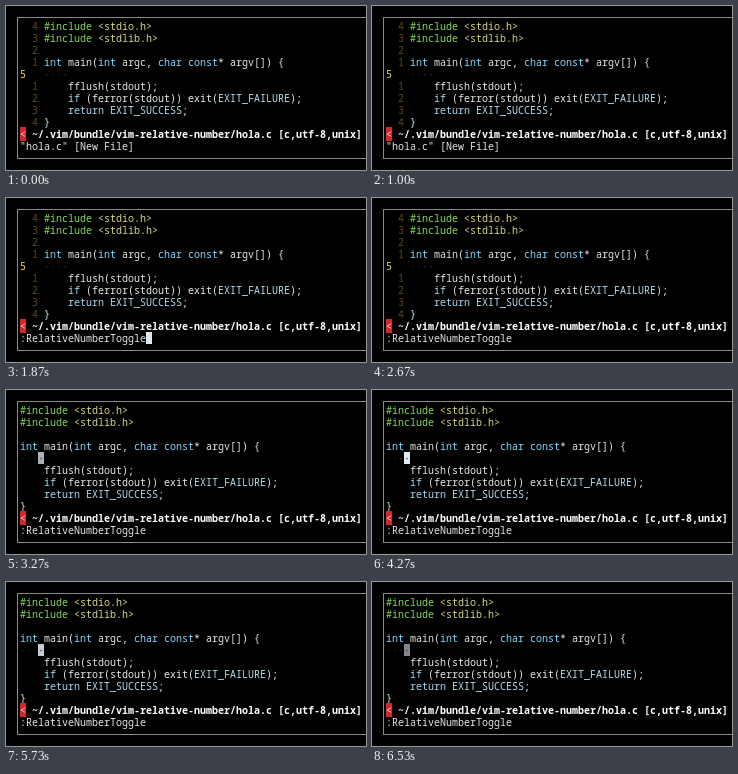
These frames come from a looping animation (360x164 px, 6600 ms). An HTML page:

```html
<!DOCTYPE html>
<html lang="en">
<head>
<meta charset="utf-8">
<title>Relative line numbers</title>
<style>
  html, body { margin: 0; width: 100%; height: 100%; overflow: hidden; background: #000; }
  #term {
    position: absolute; left: 11px; top: 11px; width: 349px; height: 140px;
    border: 1px solid #8a8a8a; border-right: 0;
  }
  .row, #cursor {
    position: absolute; left: 14px; height: 12px; margin: 0; white-space: pre;
    font: 10px/12px "Noto Sans Mono", "DejaVu Sans Mono", monospace; color: #e4e8ea;
  }
  .pre { color: #87d75f; }
  .inc { color: #d7d787; }
  .type { color: #87d7ff; }
  .key { color: #a8d8f0; }
  .const { color: #b8dcec; }
  .num { color: #5c4820; }
  .cur { color: #f0e040; }
  .trail { color: #34383c; }
  .status { font-weight: 700; color: #fff; }
  .cut { background: #d02828; color: #ffd8d0; font-weight: 400; }
  #cursor { width: 6px; background: #e0e8f0; color: #181c20; }
</style>
</head>
<body>
<div id="term"></div>
<div id="rows"></div>
<div id="cursor"></div>
<script>
const LOOP = 6600, STEP = 1000 / 15, CELL = 6, LINE = 12, TOP = 14, LEFT = 14;
const CURSOR_ROW = 4, PROMPT_ROW = 10;
const TOGGLE_AT = 3200;

const span = (cls, text) =>
  `<span class="${cls}">${text.replace(/</g, '&lt;').replace(/>/g, '&gt;')}</span>`;

const code = [
  span('pre', '#include ') + span('inc', '<stdio.h>'),
  span('pre', '#include ') + span('inc', '<stdlib.h>'),
  '',
  span('type', 'int') + ' main(' + span('type', 'int') + ' argc, ' +
    span('type', 'char const') + '* argv[]) {',
  span('trail', '····'),
  '    fflush(stdout);',
  '    ' + span('key', 'if') + ' (ferror(stdout)) exit(' + span('const', 'EXIT_FAILURE') + ');',
  '    ' + span('key', 'return') + ' ' + span('const', 'EXIT_SUCCESS') + ';',
  '}'
];
const status = span('cut', '<') + ' ~/.vim/bundle/vim-relative-number/hola.c [c,utf-8,unix]';

// Time and text of the bottom line
const prompts = [
  [0, '"hola.c" [New File]'],
  [1200, ':'],
  [1670, ':R'],
  [1730, ':Re'],
  [1800, ':Rel'],
  [1870, ':RelativeNumberToggle']
];

// Start, duration, opacity before and after each cursor fade
const fades = [
  [0, 200, 0, 1],
  [530, 200, 1, 0],
  [1000, 200, 0, 1],
  [2200, 190, 1, 0],
  [2670, 190, 0, 1],
  [3200, 600, 0.75, 1],
  [4270, 600, 1, 0],
  [5270, 600, 0, 1],
  [6270, 600, 1, 0]
];

const rows = document.getElementById('rows');
const cursor = document.getElementById('cursor');
const lines = Array.from({ length: PROMPT_ROW + 1 }, (_, i) => {
  const row = document.createElement('pre');
  row.className = 'row';
  row.style.top = TOP + i * LINE + 'px';
  return rows.appendChild(row);
});
lines[9].classList.add('status');
lines[9].innerHTML = status;

const latest = (table, t) => table.filter(entry => entry[0] <= t).pop();

function gutter(i) {
  return i === CURSOR_ROW
    ? span('cur', '5   ')
    : span('num', `  ${Math.abs(i - CURSOR_ROW)} `);
}

let numbered = null;
function showCode(withNumbers) {
  if (numbered === withNumbers) return;
  numbered = withNumbers;
  code.forEach((text, i) => {
    lines[i].innerHTML = (withNumbers ? gutter(i) : '') + text;
  });
}

function cursorAlpha(t) {
  const [start, length, from, to] = latest(fades, t);
  const p = Math.min(1, (t - start) / length);
  const eased = (1 - Math.cos(Math.PI * p)) / 2;
  return from + (to - from) * eased;
}

function draw(now) {
  const clock = now % LOOP;
  // Small allowance for event times rounded to 10 ms
  const t = Math.floor((clock + 4) / STEP) * STEP + 4;
  const numbers = t < TOGGLE_AT;
  const prompt = latest(prompts, t)[1];
  const typing = numbers && prompt[0] === ':';
  const col = typing ? prompt.length : numbers ? 7 : 3;
  const row = typing ? PROMPT_ROW : CURSOR_ROW;

  showCode(numbers);
  lines[PROMPT_ROW].textContent = prompt;
  cursor.textContent = typing ? '' : '·';
  cursor.style.left = LEFT + col * CELL + 'px';
  cursor.style.top = TOP + row * LINE + 'px';
  cursor.style.opacity = cursorAlpha(t);
}

const begin = performance.now();
function tick() {
  draw(performance.now() - begin);
  requestAnimationFrame(tick);
}
tick();
</script>
</body>
</html>
```
